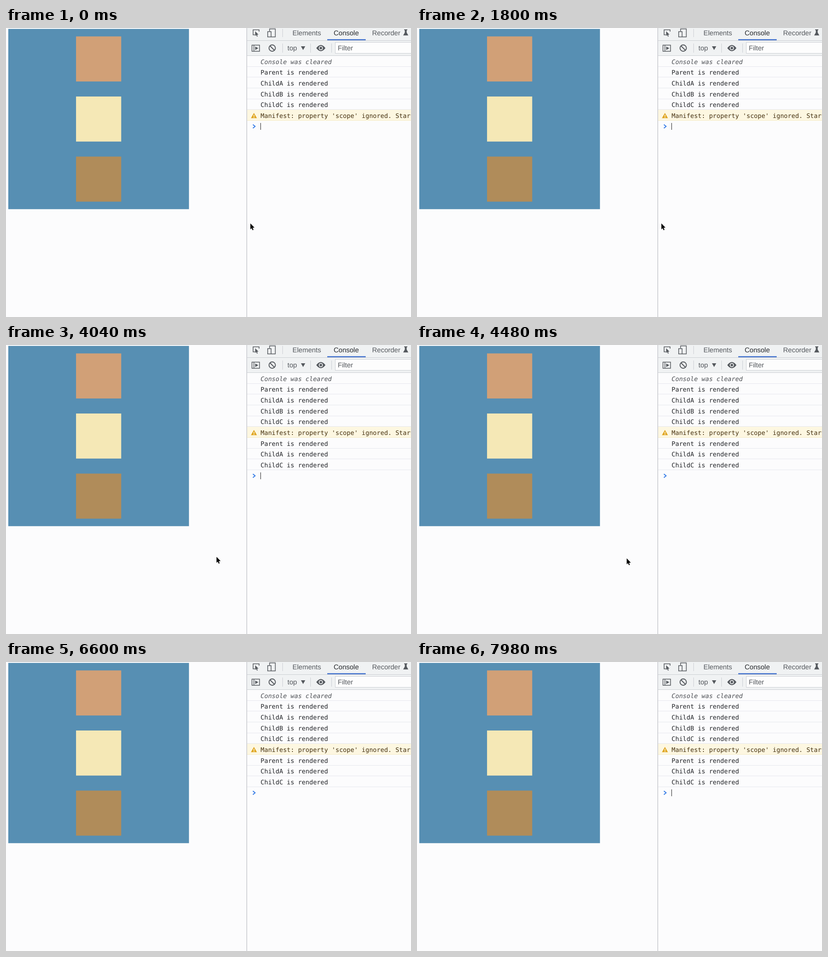
Write an HTML page with a canvas that moves like this. It is 885x633 px and loops after 8000 ms.

```html
<!DOCTYPE html>
<html lang="en">
<head>
<meta charset="utf-8">
<title>Console</title>
<style>
html, body { margin: 0; width: 100%; height: 100%; overflow: hidden; background: #fcfcfd; }
canvas { display: block; width: 885px; height: 633px; }
</style>
</head>
<body>
<canvas id="stage" width="885" height="633"></canvas>
<script>
const ctx = document.getElementById('stage').getContext('2d');
const W = 885, H = 633, LOOP = 8000;
const PANEL = 527, TOP = 61, ROW = 23.67, TEXT_X = 556.3;
const RENDER_AT = 3560;
const BLINK = 895, BLINK_START = 1745;
const SANS = '15px "Liberation Sans", Arial, sans-serif';
const MONO = '13.6px "DejaVu Sans Mono", monospace';
const PAPER = '#fcfcfd', BAR = '#f0f2f3', LINE = '#cbced3', INK = '#54585d', AMBER = '#dfa51f';

const WARNING = "Manifest: property 'scope' ignored. Start";
const rendered = names => names.map(name => name + ' is rendered');
const firstLogs = ['Console was cleared', ...rendered(['Parent', 'ChildA', 'ChildB', 'ChildC']), WARNING];
const laterLogs = rendered(['Parent', 'ChildA', 'ChildC']);

const rowTop = i => TOP + i * ROW;

function rect(x, y, w, h, color) {
  ctx.fillStyle = color;
  ctx.fillRect(x, y, w, h);
}

function box(x, y, w, h, width = 1.5) {
  ctx.strokeStyle = INK;
  ctx.lineWidth = width;
  ctx.strokeRect(x, y, w, h);
}

function text(str, x, y, color, font = SANS) {
  ctx.font = font;
  ctx.fillStyle = color;
  ctx.fillText(str, x, y);
}

function trace(points) {
  ctx.beginPath();
  points.forEach(([x, y]) => ctx.lineTo(x, y));
}

function stroke(points, color = INK, width = 1.5) {
  trace(points);
  ctx.strokeStyle = color;
  ctx.lineWidth = width;
  ctx.stroke();
}

function circle(x, y, r) {
  ctx.beginPath();
  ctx.arc(x, y, r, 0, Math.PI * 2);
}

function disc(x, y, r, color) {
  circle(x, y, r);
  ctx.fillStyle = color;
  ctx.fill();
}

// Equilateral triangle; turn is the quarter turns from pointing right
function triangle(x, y, r, turn, color = INK) {
  const corners = [0, 1, 2].map(i => {
    const a = turn * Math.PI / 2 + i * Math.PI * 2 / 3;
    return [x + r * Math.cos(a), y + r * Math.sin(a)];
  });
  trace(corners);
  ctx.closePath();
  ctx.fillStyle = color;
  ctx.fill();
}

function arrow(x, y, size, color, edge) {
  ctx.save();
  ctx.translate(x, y);
  ctx.scale(size, size);
  ctx.lineJoin = 'round';
  trace([[0, 0], [0, 13], [2.9, 10.4], [4.8, 15], [6.9, 14.1], [5, 9.6], [9, 9.3]]);
  ctx.closePath();
  if (edge) {
    ctx.strokeStyle = edge;
    ctx.lineWidth = 2;
    ctx.stroke();
  }
  ctx.fillStyle = color;
  ctx.fill();
  ctx.restore();
}

// Three squares spaced evenly around, each a quarter of the parent
function drawPage() {
  const x = 5, y = 2, size = 394.8, side = size / 4, gap = side / 3;
  rect(x, y, size, size, '#578fb3');
  ['#d1a077', '#f5e8b6', '#b08c5a'].forEach((color, i) => {
    rect(x + (size - side) / 2, y + gap / 2 + i * (side + gap), side, side, color);
  });
}

function drawTabs() {
  rect(PANEL, 0, W - PANEL, TOP - 1, BAR);
  rect(PANEL, 27, W - PANEL, 1, LINE);
  rect(702, 24.6, 84, 2.2, '#3064ca');
  rect(604, 2, 1, 18, LINE);

  // element picker
  stroke([[544, 15], [540, 15], [540, 4], [553, 4], [553, 8]]);
  arrow(544.5, 7, 0.8, INK);

  // device toggle
  stroke([[576, 7], [576, 2], [588.5, 2], [588.5, 19.5], [580, 19.5]]);
  box(571.8, 8, 7.5, 11.5);

  text('Elements', 626, 16, INK);
  text('Console', 716, 16, '#26292d');
  text('Recorder', 800, 16, INK);

  // flask
  rect(870, 3, 7, 1.7, INK);
  rect(871.5, 4, 4, 6, INK);
  triangle(873.5, 13, 6.5, -1);
}

function drawToolbar() {
  const mid = 44;
  rect(PANEL, TOP - 1, W - PANEL, 1, LINE);
  for (const x of [604, 665, 711]) rect(x, mid - 10, 1, 20, LINE);

  // sidebar toggle
  box(537.5, 37.5, 16.5, 13.5);
  rect(541, 38, 1.4, 13, INK);
  triangle(546.8, mid + 0.3, 4.5, 0);

  // clear
  circle(581.7, mid, 7);
  ctx.lineWidth = 1.9;
  ctx.stroke();
  stroke([[576.7, mid - 5], [586.7, mid + 5]], INK, 1.9);

  text('top', 615, 49, INK);
  triangle(649.2, mid - 1.2, 5.4, 1);

  // eye
  ctx.beginPath();
  ctx.moveTo(678, mid);
  ctx.quadraticCurveTo(688, mid - 13.5, 698, mid);
  ctx.quadraticCurveTo(688, mid + 13.5, 678, mid);
  ctx.fillStyle = INK;
  ctx.fill();
  disc(688, mid, 4.6, BAR);
  disc(688, mid, 2.8, INK);

  rect(719, 31, W - 719, 25, LINE);
  rect(720, 32, W - 720, 23, '#fdfdfd');
  text('Filter', 725, 49, INK);
}

function drawRow(str, i) {
  const y = rowTop(i);
  const base = Math.round(y + 17.6);
  const bottom = Math.round(rowTop(i + 1)) - 1;
  if (str === WARNING) {
    rect(PANEL, Math.round(y), W - PANEL, ROW, '#fdf7e1');
    triangle(541.8, y + 14.3, 7.6, -1, AMBER);
    rect(541.1, y + 11, 1.5, 4, '#fff');
    rect(541.1, y + 16, 1.5, 1.5, '#fff');
    rect(PANEL, bottom, W - PANEL, 1, '#f5ebc4');
    text(str, TEXT_X, base, '#453110', MONO);
  } else {
    const cleared = i === 0;
    rect(PANEL, bottom, W - PANEL, 1, '#e6e7ee');
    text(str, TEXT_X, base, cleared ? '#4a4d52' : '#202226', cleared ? 'italic ' + MONO : MONO);
  }
}

function drawPrompt(t, i) {
  const y = rowTop(i) + 12.5;
  ctx.lineJoin = 'miter';
  stroke([[539.5, y - 4], [544.3, y], [539.5, y + 4]], '#367ce6', 2);
  const phase = (t - BLINK_START + 2 * BLINK) % (2 * BLINK);
  if (t < 950 || phase < BLINK) rect(556, Math.round(y - 7.6), 1, 15, '#222');
}

function drawConsole(t) {
  const rows = t < RENDER_AT ? firstLogs : firstLogs.concat(laterLogs);
  rows.forEach(drawRow);
  drawPrompt(t, rows.length);
}

function ease(t, from, to) {
  const u = Math.min(1, Math.max(0, (t - from) / (to - from)));
  return u * u * (3 - 2 * u);
}

// Rests over the console, crosses the divider, drifts down the page and leaves
function drawPointer(t) {
  const divider = ease(t, 2440, 2700);
  const page = ease(t, 3480, 3900);
  const lower = ease(t, 4400, 4900);
  const leave = ease(t, 5950, 6300);
  const x = 534 - 7 * divider - 67 * page - 25 * lower - 10 * leave;
  const y = 427 + 3 * divider + 33 * page + 48 * lower + 139 * leave;
  if (Math.abs(x - PANEL) < 4) {
    stroke([[x - 6, y], [x + 6, y]], '#000', 2.2);
    stroke([[x, y - 4.5], [x, y + 4.5]], '#000', 1);
    triangle(x + 4, y, 3.8, 0, '#000');
    triangle(x - 4, y, 3.8, 2, '#000');
  } else {
    arrow(x, y + 1, 1, '#000', '#fff');
  }
}

function draw(t) {
  ctx.textRendering = 'geometricPrecision';
  rect(0, 0, W, H, PAPER);
  drawPage();
  drawTabs();
  drawToolbar();
  drawConsole(t);
  rect(525.5, 0, 1.2, H, '#b9bbc2');
  drawPointer(t);
}

const start = performance.now();
function tick() {
  draw((performance.now() - start) % LOOP);
  requestAnimationFrame(tick);
}
tick();
</script>
</body>
</html>
```
